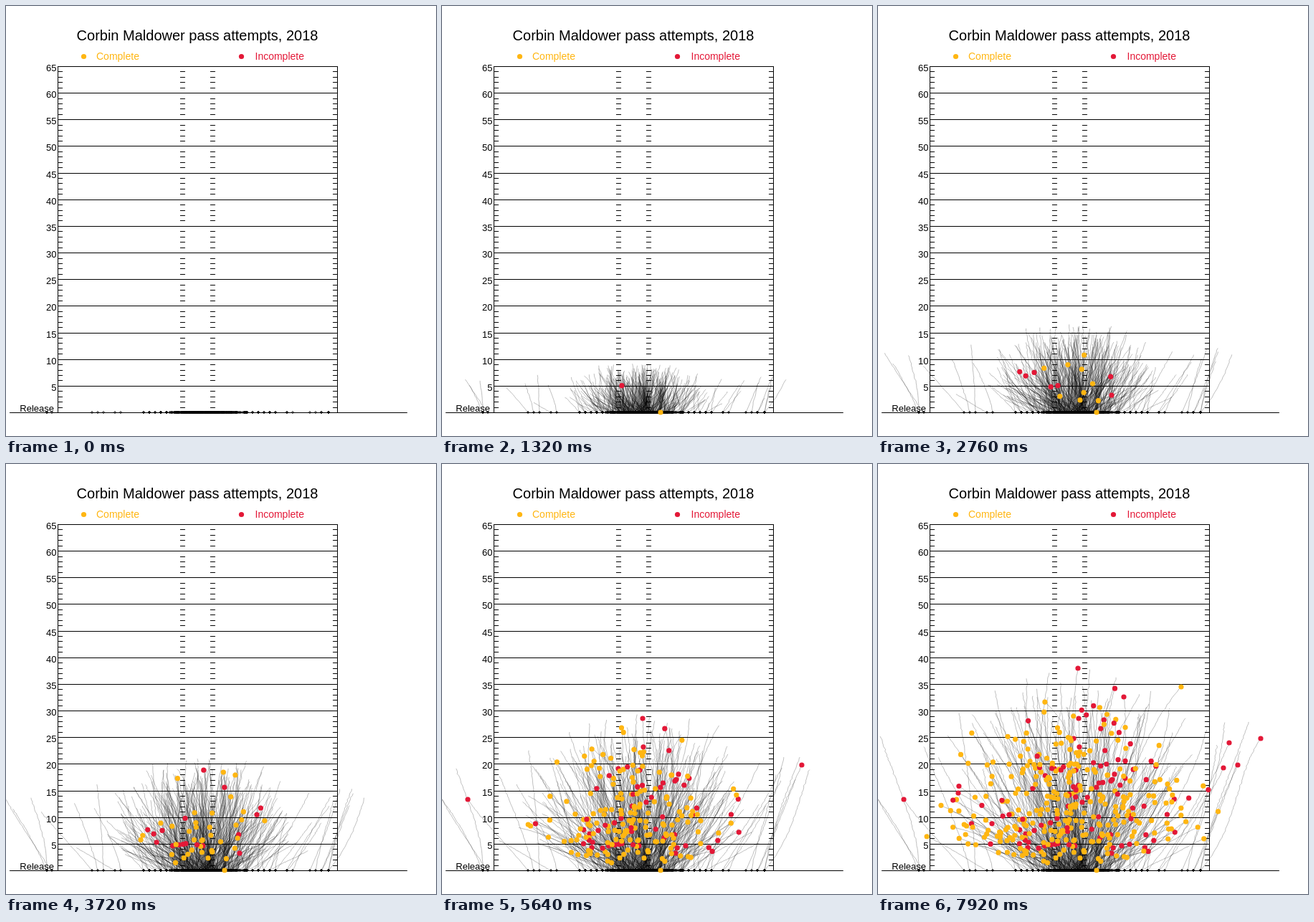
Write an HTML page with a canvas that moves like this. It is 600 by 600 pixels and loops after 8000 ms.

```html
<!DOCTYPE html>
<html lang="en">
<head>
<meta charset="utf-8">
<title>Pass attempts</title>
<style>
  html, body { margin: 0; width: 100%; height: 100%; overflow: hidden; background: #fff; }
  svg, canvas { position: absolute; left: 0; top: 0; width: 600px; height: 600px; }
  text { font-family: "Liberation Sans", Arial, sans-serif; }
  #field { stroke: #000; stroke-width: 1; fill: none; shape-rendering: crispEdges; }
  #yards { font-size: 13px; text-anchor: end; }
</style>
</head>
<body>
<svg viewBox="0 0 600 600">
  <text x="267" y="48" font-size="20" text-anchor="middle">Corbin Maldower pass attempts, 2018</text>
  <g font-size="14">
    <circle cx="108.5" cy="70.5" r="3.6" fill="#ffb612"/>
    <text x="126" y="75" fill="#ffb612">Complete</text>
    <circle cx="328.5" cy="70.5" r="3.6" fill="#e31837"/>
    <text x="347.5" y="75" fill="#e31837">Incomplete</text>
  </g>
  <path id="field"/>
  <g id="yards"><text x="67" y="566">Release</text></g>
</svg>
<canvas id="plays" width="600" height="600"></canvas>
<script>
const STEP = 120, LOOP = 8000, LAST = 66;
const BASE = 567.5, MID = 267, YARD = 7.431;
const PASSES = 490, MEDIAN_LANDING = 50;
const GOLD = '#ffb612', RED = '#e31837';

// Field lines, yard ticks and labels
const yards = document.getElementById('yards');
let field = `M5 ${BASE}H560M72.5 84.5V${BASE}M462.5 84.5V${BASE}`;
for (let yard = 1; yard <= 65; yard++) {
  const y = Math.floor(BASE - YARD * yard) + 0.5;
  if (yard % 5) {
    for (const x of [72, 243, 285, 456]) field += `M${x} ${y}h7`;
  } else {
    field += `M72 ${y}H463`;
    const label = document.createElementNS('http://www.w3.org/2000/svg', 'text');
    label.setAttribute('x', 70.5);
    label.setAttribute('y', y + 6);
    label.textContent = yard;
    yards.append(label);
  }
}
document.getElementById('field').setAttribute('d', field);

let seed = 2018;
function random() {
  seed = (seed * 1664525 + 1013904223) >>> 0;
  return seed / 4294967296;
}
const between = (a, b) => a + (b - a) * random();
const spread = size => (random() + random() + random() - 1.5) * size;

// How far the fastest throw has travelled after some steps
const front = steps => 11 * Math.pow(steps, 0.8);

// Releases crowd the middle; the few wide ones share spots
function releaseFor(x) {
  const dx = x - MID;
  const pull = Math.abs(dx) > 185 ? between(0.55, 0.8) : between(0.12, 0.45);
  const start = MID + 10 + dx * pull + spread(36);
  if (start > 228 && start < 337) return start;
  return Math.max(57, Math.min(450, Math.round(start / 8) * 8));
}

const routes = [];

// One path point per step, along a loosely bent cubic
function addRoute(x, y, steps, color) {
  const x0 = releaseFor(x), dx = x - x0, dy = y - BASE;
  const bendA = spread(0.18), bendB = spread(0.18);
  const points = [];
  for (let n = 0; n <= Math.min(steps, LAST); n++) {
    const p = Math.pow(n / steps, 0.8), q = 1 - p;
    const side = 3 * p * q * (q * bendA + p * bendB);
    const shake = n && n < steps ? spread(0.8) : 0;
    points.push([x0 + dx * p - dy * side + shake, BASE + dy * p - Math.abs(dx * side) * 0.5]);
  }
  routes.push({ points, steps, color, x, y });
}

// Landing times follow a log-logistic curve; short throws land first
for (let i = 0; i < PASSES; i++) {
  const share = (i + 0.5) / PASSES;
  const steps = Math.round(MEDIAN_LANDING * Math.pow(share / (1 - share), 1 / 4.5));
  const color = random() < 0.24 ? RED : GOLD;
  const deep = steps > LAST;
  const angle = deep ? between(-0.95, 0.95) : between(-1.42, 1.42);
  const nearest = deep ? 0.62 : steps / 130;
  const skew = color === GOLD && !deep ? 1.6 : 1;
  const reach = front(steps) * (nearest + (0.97 - nearest) * Math.pow(random(), skew));
  addRoute(MID + Math.sin(angle) * reach * 0.75, BASE - 3 - Math.cos(angle) * reach * 0.92, steps, color);
}

// The throws that stand out: first, deepest and out of bounds
addRoute(305, 567, 6, GOLD);
addRoute(36, 468, 40, RED);
addRoute(280, 355, 46, RED);
addRoute(502, 420, 46, RED);
addRoute(343, 325, 56, RED);
addRoute(482, 424, 56, RED);
addRoute(490, 389, 62, RED);
addRoute(423, 311, 64, GOLD);
addRoute(279, 285, 65, RED);
addRoute(534, 383, 66, RED);
addRoute(522, 345, 72, RED);

const ctx = document.getElementById('plays').getContext('2d');

function disc(x, y, r) {
  ctx.beginPath();
  ctx.arc(x, y, r, 0, Math.PI * 2);
}

function draw(step) {
  ctx.clearRect(0, 0, 600, 600);
  ctx.lineWidth = 1;
  ctx.strokeStyle = 'rgba(0,0,0,0.25)';
  for (const { points } of routes) {
    ctx.beginPath();
    for (const [x, y] of points.slice(0, step + 1)) ctx.lineTo(x, y);
    ctx.stroke();
  }
  ctx.lineWidth = 0.8;
  ctx.strokeStyle = '#000';
  ctx.fillStyle = step ? 'rgba(0,0,0,0.5)' : 'transparent';
  for (const { points } of routes) {
    disc(points[0][0], 567, 1.3);
    ctx.fill();
    ctx.stroke();
  }
  for (const { x, y, steps, color } of routes) {
    if (steps > step) continue;
    ctx.fillStyle = color;
    disc(x, y, 3.6);
    ctx.fill();
  }
}

let shown = -1;
function tick() {
  const step = Math.floor(performance.now() % LOOP / STEP);
  if (step !== shown) draw(shown = step);
  requestAnimationFrame(tick);
}
tick();
</script>
</body>
</html>
```
